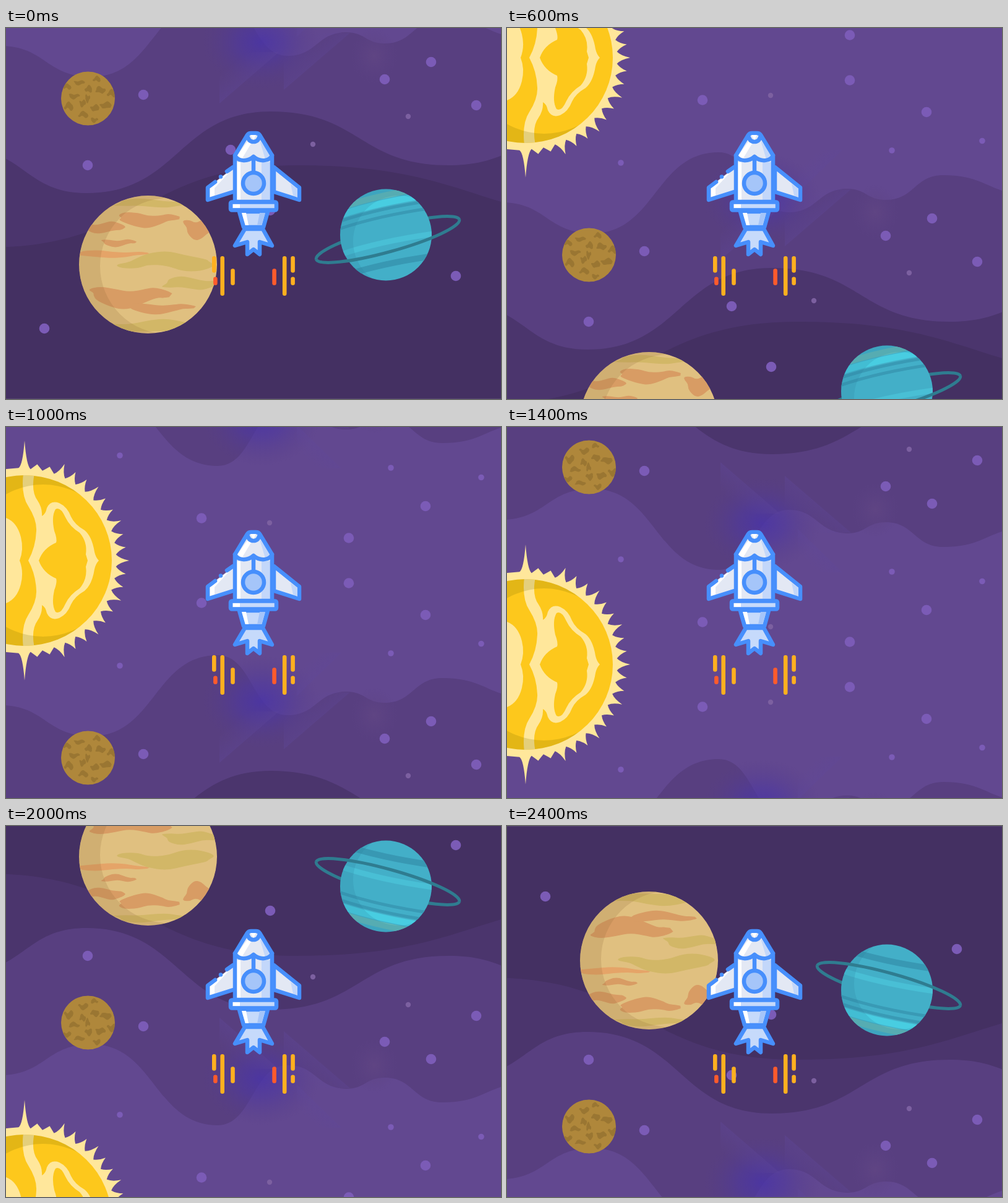
Recreate the animation shown at these times as an HTML page. Size 800 px wide and 600 px high, loop 2600 ms.

```html
<!DOCTYPE html>
<html lang="en">
<head>
<meta charset="utf-8">
<title>Rocket</title>
<style>
html, body { margin: 0; width: 100%; height: 100%; overflow: hidden; background: #443062; }
svg { display: block; width: 800px; height: 600px; }
</style>
</head>
<body>
<svg viewBox="0 0 800 600">
  <defs>
    <radialGradient id="glow">
      <stop offset="0" stop-color="#4a34a6" stop-opacity=".85"/>
      <stop offset=".4" stop-color="#4e389e" stop-opacity=".6"/>
      <stop offset="1" stop-color="#563d88" stop-opacity="0"/>
    </radialGradient>
    <radialGradient id="haze">
      <stop offset="0" stop-color="#614684" stop-opacity=".8"/>
      <stop offset="1" stop-color="#5c4285" stop-opacity="0"/>
    </radialGradient>
    <linearGradient id="ridge" x1=".6" y1=".6" x2=".25" y2=".2">
      <stop offset="0" stop-color="#5f479a" stop-opacity=".45"/>
      <stop offset="1" stop-color="#5f479a" stop-opacity="0"/>
    </linearGradient>
    <clipPath id="moonClip"><circle cx="132.5" cy="319" r="43.5"/></clipPath>
    <clipPath id="sandClip"><circle cx="229.5" cy="587.5" r="111.5"/></clipPath>
    <clipPath id="tealClip"><circle cx="614" cy="539.5" r="74"/></clipPath>
    <clipPath id="sunClip"><ellipse cx="30" cy="0" rx="141" ry="138"/></clipPath>
    <clipPath id="sky"><rect width="800" height="805"/></clipPath>
    <clipPath id="body"><path d="M370 206V281H430V206L410 173Q408 170 404 170H396Q392 170 390 173Z"/></clipPath>

    <g id="panel" clip-path="url(#sky)">
      <rect width="800" height="805" fill="#624890"/>
      <g id="hill"></g>
      <ellipse cx="412" cy="228" rx="95" ry="75" fill="url(#glow)"/>
      <g fill="url(#ridge)">
        <path d="M441 244L345 327V244Z"/>
        <path d="M556 213L449 305V213Z"/>
        <path d="M542 149L470 219V149Z"/>
      </g>
      <ellipse cx="595" cy="250" rx="38" ry="45" fill="url(#haze)"/>
      <g id="plains"></g>
      <path d="M0 804.5H800" stroke="#55436f"/>
      <g id="stars"></g>

      <g clip-path="url(#moonClip)">
        <circle cx="132.5" cy="319" r="44" fill="#af873b"/>
        <g id="moon"></g>
      </g>

      <g clip-path="url(#sandClip)">
        <circle cx="229.5" cy="587.5" r="112" fill="#e0c080"/>
        <g id="sand" transform="translate(0 205)"></g>
        <path fill-rule="evenodd" d="M100 460H360V710H100ZM152 590a110 110 0 0 0 220 0a110 110 0 0 0-220 0" fill="#926838" opacity=".2"/>
      </g>

      <g fill="none" stroke="#2f7c90" stroke-width="5">
        <path d="M-120 0A120 20 0 0 1 120 0" transform="translate(617 547) rotate(-15.5)"/>
        <g clip-path="url(#tealClip)">
          <circle cx="614" cy="539.5" r="75" fill="#43afc8" stroke="none"/>
          <g id="teal" transform="translate(614 539.5)"></g>
          <path fill-rule="evenodd" d="M530 460H700V620H530ZM561 550a74 74 0 0 0 148 0a74 74 0 0 0-148 0" fill="#287e9a" opacity=".2" stroke="none"/>
        </g>
        <path d="M-120 0A120 20 0 0 0 120 0" transform="translate(617 547) rotate(-15.5)"/>
      </g>

      <g id="rays" fill="#ffe79b"></g>
      <g clip-path="url(#sunClip)">
        <rect width="180" height="140" fill="#fdc81c"/>
        <g fill="#ffe79b">
          <path d="M0 0H22Q29 18 24 38Q18 62 0 69Z"/>
          <path d="M36 0Q48 22 49 48Q50 66 36 88Q24 106 28 141H46Q40 112 51 97Q59 85 58 72Q64 75 66 85Q72 98 86 93Q99 87 105 71Q111 58 127 49Q139 39 143 14Q145 5 150 0Z"/>
        </g>
        <path d="M53 0Q60 20 81 29Q83 35 78 48Q73 71 80 83Q88 88 96 70Q103 55 119 45Q132 30 129 10L132 0Z" fill="#fdc81c"/>
        <path fill-rule="evenodd" d="M-110 0H180V150H-110ZM-63 0a123 123 0 0 0 246 0z" fill="#776f00" opacity=".2"/>
      </g>
    </g>
  </defs>

  <use href="#panel" id="lower"/>
  <use href="#panel" id="upper"/>

  <g stroke="#478ffc" stroke-width="6.5" stroke-linejoin="round" stroke-linecap="round" fill="#e3e8f4">
    <path d="M369 225L326 258V278L369 265Z" stroke="none"/>
    <path d="M365 229L330 257V273L337 271V259Z" fill="#fff" stroke="none"/>
    <path d="M367 265L326 278V258L338 249M347 240.5h.01M357 232L367 225" fill="none"/>
    <path d="M433 225L474 258V278L433 265Z"/>
    <path d="M460 252L471 260V274L464 271Z" fill="#c3d7fa" stroke="none"/>
    <g clip-path="url(#body)" stroke="none">
      <rect x="365" y="165" width="70" height="120"/>
      <path d="M372 217H379V281H372ZM390 184L374 206L381 212L396 187Z" fill="#fff"/>
      <path d="M413 217H432V281H413ZM410 182L419 212L430 207Z" fill="#c3d7fa"/>
    </g>
    <path d="M370 206V281H430V206L410 173Q408 170 404 170H396Q392 170 390 173Z" fill="none"/>
    <path d="M390 174Q392 184 400 184Q408 184 410 174M370 206C374 216 390 217 400 208C410 217 426 216 430 206M400 210V232" fill="none"/>
    <path d="M395 173H404L400 181Z" fill="#fff" stroke="none"/>
    <circle cx="400" cy="251" r="17" fill="#a5c5f9"/>
    <path d="M377 297L384 322H416L423 297Z" fill="#c6dafb"/>
    <path d="M381 299L387 319H392L388 299Z" fill="#fff" stroke="none"/>
    <path d="M410 299H419L413 319H406Z" fill="#a5c5f9" stroke="none"/>
    <rect x="363" y="281.5" width="74" height="13" rx="2" fill="#c6dafb"/>
    <path d="M367 285H378V291H367Z" fill="#fff" stroke="none"/>
    <path d="M386 325L370 352L390 346V366L400 358L410 366V346L430 352L415 325Z" fill="#c6dafb"/>
  </g>
  <g fill="none" stroke="#ffb01f" stroke-width="6.6" stroke-linecap="round">
    <path d="M336.3 372.3V392.5M349.7 372.3V429.7M366.5 392.5V412.7M450.2 372.3V429.7M463.6 372.3V392.5M463.6 405.8V412.7"/>
    <path d="M338.4 405.8V412.7M433.6 392.5V412.7" stroke="#ff5b2c"/>
  </g>
</svg>
<script>
const get = id => document.getElementById(id);

function add(parent, tag, attrs) {
  const el = document.createElementNS("http://www.w3.org/2000/svg", tag);
  for (const key in attrs) el.setAttribute(key, attrs[key]);
  get(parent).append(el);
}

let seed = 7;
const rand = (lo, hi) => {
  seed = seed * 16807 % 2147483647;
  return lo + (hi - lo) * seed / 2147483647;
};

// Ground below a wave that levels out at each crest and trough
function land(parent, fill, ...turns) {
  let [x, y] = turns[0], d = `M${x} ${y}`;
  for (const [nx, ny] of turns.slice(1)) {
    const mid = (x + nx) / 2;
    d += `C${mid} ${y} ${mid} ${ny} ${nx} ${ny}`;
    [x, y] = [nx, ny];
  }
  add(parent, "path", { fill, d: d + `V805H${turns[0][0]}Z` });
}

// Irregular flat patch: an ellipse with a wavy rim, drawn through rim midpoints
function patch(parent, fill, cx, cy, w, h) {
  const n = 16, phase = rand(0, 6);
  const rim = i => {
    const a = i % n / n * 2 * Math.PI;
    return [cx + w * Math.cos(a) * (1 + .15 * Math.sin(5 * a + phase)),
            cy + h * (Math.sin(a) * (1 + .3 * Math.sin(3 * a + phase)) + .4 * Math.sin(4 * Math.cos(a) + phase))];
  };
  let d = "";
  for (let i = 0; i < n; i++) {
    const p = rim(i), q = rim(i + 1), m = [(p[0] + q[0]) / 2, (p[1] + q[1]) / 2];
    d += (i ? `Q${p} ` : "M") + m;
  }
  add(parent, "path", { fill, d: d + "Z" });
}

land("hill", "#583f80", [-10, 234], [138, 284], [342, 153], [455, 250], [550, 212], [612, 230], [705, 190], [850, 222]);
land("plains", "#4b356d", [-70, 400], [130, 472], [428, 340], [715, 427], [900, 390]);
land("plains", "#443062", [-30, 560], [470, 427], [1050, 520]);

function stars(fill, r, ...spots) {
  for (const [cx, cy] of spots) add("stars", "circle", { cx, cy, r, fill });
}
stars("#7b5bb6", 8.3, [222, 313], [132, 427], [62, 691], [363, 402], [427, 500], [612, 288], [687, 260],
  [760, 330], [727, 606], [554, 36.5], [316, 68.5], [678, 88]);
stars("#7b5bb6", 4.8, [622, 150], [768, 134.5], [184, 170]);
stars("#7c60a0", 4.2, [496, 393], [650, 348], [426, 61]);

for (let i = 0; i < 14; i++) {
  const a = i * 2.4, r = 11 * Math.sqrt(i);
  patch("moon", "#9a7632", 132 + r * Math.cos(a), 319 + r * Math.sin(a), rand(4, 10), rand(3, 6));
}

const orange = "#d89c64", khaki = "#d2b767";
patch("sand", khaki, 235, 284, 60, 6);
patch("sand", orange, 230, 310, 50, 10);
patch("sand", orange, 158, 322, 34, 8);
patch("sand", orange, 315, 322, 28, 15);
patch("sand", orange, 182, 347, 28, 5);
patch("sand", "#e5a468", 172, 366, 58, 5);
patch("sand", khaki, 260, 378, 76, 12);
patch("sand", khaki, 298, 414, 45, 9);
patch("sand", orange, 200, 434, 66, 14);
patch("sand", orange, 250, 453, 55, 7);
patch("sand", khaki, 235, 482, 75, 9);

function stripe(y, width, stroke) {
  add("teal", "path", { d: `M-80 ${y + 20}Q-10 ${y - 4} 80 ${y - 16}`, stroke, "stroke-width": width });
}
stripe(-62, 10, "#62b8b7");
stripe(-50, 11, "#48cde1");
stripe(-40, 5, "#399ab5");
stripe(-28, 5, "#399ab5");
stripe(14, 9, "#49bfd5");
stripe(50, 10, "#3898b3");

// Sun rays: concave spikes around a quarter turn, the last one tall
const STEPS = 12;
const polar = (i, r) => {
  const a = i / STEPS * Math.PI / 2;
  return [30 + r * Math.cos(a), r * Math.sin(a)];
};
const tip = i => i === STEPS ? 194 : i > 9 ? 157 : i % 3 ? 165 : 169;
let rays = "M" + polar(0, tip(0));
for (let i = 0; i < STEPS; i++)
  rays += `Q${polar(i + .15, 154)} ${polar(i + .5, 148)}Q${polar(i + .85, 154)} ${polar(i + 1, tip(i + 1))}`;
rays += `Q${polar(STEPS + .15, 154)} ${polar(STEPS + .5, 150)}L0 148V0Z`;
add("rays", "path", { d: rays });

const LOOP = 2600, STEP = 200;
function draw(now) {
  const axis = Math.round(-205 + Math.floor(now % LOOP / STEP) * 1010 / 12);
  get("lower").setAttribute("transform", `translate(0 ${axis})`);
  get("upper").setAttribute("transform", `translate(0 ${axis}) scale(1 -1)`);
  requestAnimationFrame(draw);
}
draw(performance.now());
</script>
</body>
</html>
```
